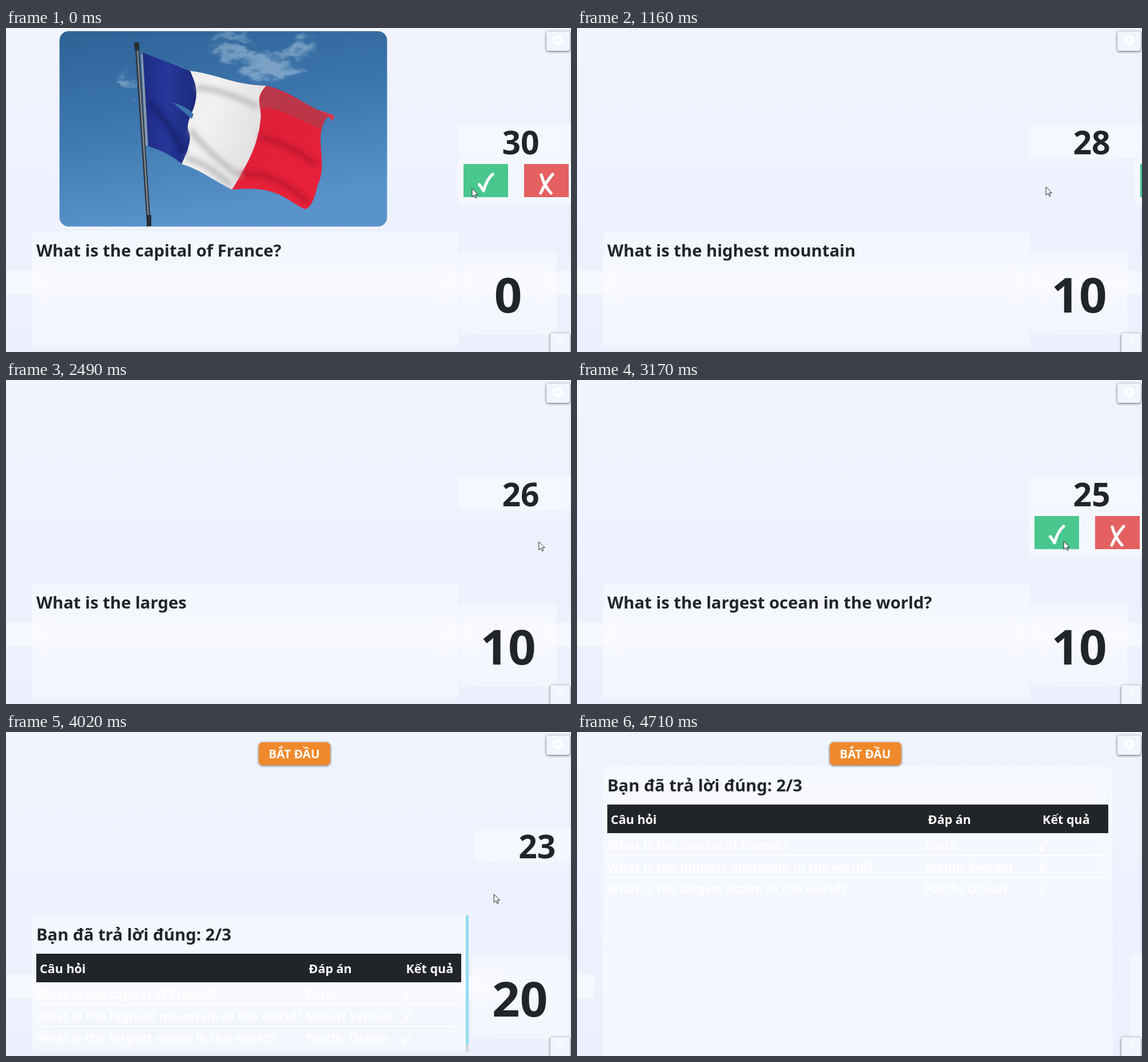
An HTML page for the animation above (4880 ms loop, 988 px wide and 567 px high).

```html
<!DOCTYPE html>
<html lang="en">
<head>
<meta charset="utf-8">
<title>Quiz</title>
<style>
  html, body { margin: 0; width: 100%; height: 100%; overflow: hidden; }
  body { position: relative; background: linear-gradient(#f0f4ff, #edf2fe 50%, #ecf0fd); }
  div, svg { position: absolute; }
  svg { inset: 0; }
  .card { background: rgba(255,255,255,.42); border-radius: 8px; backdrop-filter: blur(15px); }
  #bar { left: 0; top: 425px; height: 41px; background: rgba(255,255,255,.5); border-radius: 0 6px 6px 0; }
  #panel { left: 45px; }
  #timer { left: 790px; top: 170px; width: 220px; height: 58px; }
  #buttons { left: 790px; top: 229px; width: 220px; height: 81px; }
  #score { left: 793px; top: 390px; width: 170px; height: 147px; }
  #edge { right: 0; top: 0; width: 5px; height: 400px; background: linear-gradient(90deg, transparent, rgba(40,50,90,.06)); }
  .tool { background: #f1f5ff; border-radius: 4px; box-shadow: 0 1px 4px rgba(0,0,0,.65); }
  #start { left: 442px; top: 18px; width: 125px; height: 40px; background: #ef892b; border-radius: 7px; box-shadow: 0 1px 4px rgba(0,0,0,.6); }
  text { font: 700 21.5px "Noto Sans", "Open Sans", sans-serif; fill: #fff; white-space: pre; }
  .big { font-size: 29.2px; fill: #212529; }
  .num { fill: #212529; text-anchor: middle; }
  .icon { fill: none; stroke: #fff; stroke-linecap: round; stroke-linejoin: round; }
  .gear { fill: none; stroke: #fff; }
</style>
</head>
<body>
<div id="bar"></div>
<div id="edge"></div>
<div id="panel" class="card"></div>
<div id="timer" class="card"></div>
<div id="buttons" class="card"></div>
<div id="score" class="card"></div>
<div id="start"></div>
<div class="tool" style="left:945px;top:6px;width:41px;height:34px"></div>
<div class="tool" style="left:952px;top:534px;width:34px;height:34px"></div>

<svg width="988" height="567" viewBox="0 0 988 567">
  <defs>
    <linearGradient id="sky" x2=".25" y2="1"><stop stop-color="#2d6397"/><stop offset=".5" stop-color="#3d77ae"/><stop offset="1" stop-color="#5a93ca"/></linearGradient>
    <linearGradient id="blue"><stop stop-color="#1c2a80"/><stop offset=".5" stop-color="#26379a"/><stop offset="1" stop-color="#1b2a7c"/></linearGradient>
    <linearGradient id="white" y2=".4"><stop stop-color="#ececef"/><stop offset=".45" stop-color="#f2f1f1"/><stop offset="1" stop-color="#e2e0e1"/></linearGradient>
    <linearGradient id="red" x2=".5" y2="1"><stop stop-color="#c92f40"/><stop offset=".4" stop-color="#df2038"/><stop offset="1" stop-color="#e8223a"/></linearGradient>
    <filter id="soft" x="-50%" y="-50%" width="200%" height="200%"><feGaussianBlur stdDeviation="5"/></filter>
    <filter id="wisps" x="-30%" y="-30%" width="160%" height="160%">
      <feTurbulence type="fractalNoise" baseFrequency=".03 .05" numOctaves="4" seed="4" result="noise"/>
      <feGaussianBlur in="SourceGraphic" stdDeviation="4"/>
      <feDisplacementMap in2="noise" scale="45" xChannelSelector="R" yChannelSelector="G"/>
    </filter>
    <clipPath id="rounded"><rect x="93.500" y="5.500" width="573" height="342" rx="16"/></clipPath>
    <clipPath id="cloth"><path d="M239 43L322 75C370 81 400 100 455 101C505 113 525 140 574 154L562 156C535 190 565 235 545 275Q536 316 522 317C490 302 475 274 395 283C360 265 340 248 307 238Q285 218 249 207Z"/></clipPath>
    <path id="yes" d="M-11.500 4Q-7 9 -4 15Q2 -6 12 -14"/>
    <path id="no" d="M-9 -14Q-4 5 8 18M11 -15Q-2 0 -10 18"/>
  </defs>

  <g id="frame">
    <rect x="92.500" y="4.500" width="575" height="344" rx="17" fill="none" stroke="#fff" stroke-opacity=".65" stroke-width="2"/>
    <g id="photo" clip-path="url(#rounded)">
      <path fill="url(#sky)" d="M93 5H667V348H93Z"/>
      <g filter="url(#wisps)" fill="#a9c3db" opacity=".6">
        <ellipse cx="420" cy="50" rx="65" ry="9" transform="rotate(12 420 50)"/>
        <ellipse cx="465" cy="75" rx="58" ry="13"/>
        <ellipse cx="505" cy="38" rx="38" ry="8" transform="rotate(-12 505 38)"/>
        <ellipse cx="390" cy="15" rx="35" ry="5"/>
        <ellipse cx="213" cy="98" rx="9" ry="17" transform="rotate(-35 213 98)"/>
      </g>
      <path d="M229 32L250 347" stroke="#30363f" stroke-width="7"/>
      <path d="M230 40L249 330" stroke="#7e8b99" stroke-width="2.500"/>
      <path d="M238 45L246 206" stroke="#8b98ab" stroke-width="4"/>
      <path d="M224 25H233V38H225ZM246 327H254V347H246Z" fill="#292d34"/>
      <g clip-path="url(#cloth)">
        <path fill="url(#red)" d="M390 90H580V320H390Z"/>
        <path fill="#a94350" opacity=".65" d="M455 101Q443 120 444 138C485 140 520 165 553 178L574 154Q500 120 455 101Z"/>
        <path fill="url(#white)" d="M300 60L455 101C432 125 449 140 445 160C442 200 425 235 395 283L300 260Z"/>
        <path fill="url(#blue)" d="M230 30L322 75C330 95 336 105 331 130C327 150 314 165 319 180C326 192 318 215 307 238L245 215Z"/>
        <path fill="#3b73ab" d="M291 130Q320 139 328 151L325 159Z"/>
        <g fill="none" stroke-width="8" filter="url(#soft)">
          <path stroke="#b8b6bb" d="M333 105Q375 105 440 138M322 178Q350 215 408 259M316 228Q350 235 393 275"/>
          <path stroke="#b8172f" d="M410 255Q470 250 528 305M443 190Q490 200 545 240"/>
          <path stroke="#141f65" d="M250 130Q285 165 312 220"/>
        </g>
      </g>
      <path fill="#e53346" d="M545 143L574 153L571 163L563 153Z"/>
    </g>
  </g>

  <g id="controls">
    <path fill="#49c78e" d="M800 238h78v58h-78z"/>
    <path fill="#e46061" d="M906 238h78v58h-78z"/>
    <g class="icon" stroke-width="5.200"><use href="#yes" x="839" y="270"/><use href="#no" x="945" y="271"/></g>
  </g>

  <text id="question" class="big" x="53" y="400"></text>
  <text id="seconds" class="num" x="900" y="221" style="font-size:57px"></text>
  <text id="points" class="num" x="878" y="498" style="font-size:85px"></text>

  <g id="results">
    <text x="504" y="46" text-anchor="middle" style="font-size:20.8px">BẮT ĐẦU</text>
    <g id="table">
      <text class="big" x="53" y="44">Bạn đã trả lời đúng: 2/3</text>
      <rect class="wide" x="53" y="67" height="50" fill="#212529"/>
      <rect class="wide" x="53" y="155" height="2" fill="#fff"/>
      <rect class="wide" x="53" y="193" height="2" fill="#fff"/>
      <text x="59" y="101">Câu hỏi</text>
      <text x="53" y="146">What is the capital of France?</text>
      <text x="53" y="184">What is the highest mountain in the world?</text>
      <text x="53" y="222">What is the largest ocean in the world?</text>
      <g id="answers">
        <text x="6" y="101">Đáp án</text>
        <text y="146">Paris</text>
        <text y="184">Mount Everest</text>
        <text y="222">Pacific Ocean</text>
      </g>
      <g id="marks">
        <text x="7" y="101">Kết quả</text>
        <g class="icon" stroke-width="5">
          <use href="#yes" transform="translate(8 139) scale(.6)"/>
          <use href="#no" transform="translate(8 177) scale(.6)"/>
          <use href="#yes" transform="translate(8 215) scale(.6)"/>
        </g>
      </g>
      <g id="scroll"><rect id="track" width="5" fill="#d0d5dc"/><rect id="thumb" width="5" fill="#92dcf0"/></g>
    </g>
  </g>

  <g class="gear">
    <circle cx="965" cy="21" r="5.500" stroke-width="4.500"/>
    <circle cx="965" cy="21" r="8.500" stroke-width="3" stroke-dasharray="4.450"/>
  </g>
  <text x="969" y="557" text-anchor="middle" style="font-size:23px">?</text>
  <path id="cursor" d="M0 0V14.500L3.500 11.300L6 16.500L8 15.500L5.700 10.500H10.300Z" fill="#fff" stroke="#222" stroke-width="1"/>
</svg>

<script>
const LOOP = 4880, STEP = 168, LAST_STEP = 28;
const CLICKS = [540, 1950, 3530];
const RESULTS = 3918, GROW = 1012;
const TICKS = [300, 1170, 1840, 2340, 2830, 3500, 4020];
const QUESTIONS = [
  "What is the capital of France?",
  "What is the highest mountain in the world?",
  "What is the largest ocean in the world?"
];
const POINTER = [
  [0, 815, 281], [300, 820, 278], [1690, 820, 278], [1950, 930, 282], [2350, 932, 283],
  [3150, 851, 282], [4030, 853, 283], [4368, 893, 428], [4600, 1000, 500]
];

const $ = id => document.getElementById(id);
const clamp = v => Math.max(0, Math.min(1, v));
const move = (id, x, y = 0) => $(id).setAttribute("transform", `translate(${x} ${y})`);
const show = (id, on) => { $(id).style.display = on ? "" : "none"; };

// cubic-bezier(.25, .1, .25, 1)
function ease(x) {
  const curve = (s, a, b) => 3 * a * s * (1 - s) ** 2 + 3 * b * s * s * (1 - s) + s ** 3;
  let low = 0, high = 1;
  for (let i = 0; i < 20; i++) {
    const mid = (low + high) / 2;
    if (curve(mid, .25, .25) < x) low = mid; else high = mid;
  }
  return curve(low, .1, 1);
}

function pointerAt(t) {
  const i = POINTER.findIndex(p => p[0] > t);
  if (i < 0) return POINTER.at(-1).slice(1);
  const [t0, x0, y0] = POINTER[i - 1], [t1, x1, y1] = POINTER[i];
  const u = (t - t0) / (t1 - t0);
  return [x0 + (x1 - x0) * u, y0 + (y1 - y0) * u];
}

function drawQuiz(t, answered, since) {
  const typed = answered && answered < 3 ? Math.floor(since / 22) : Infinity;
  $("question").textContent = QUESTIONS[Math.min(answered, 2)].slice(0, typed);

  show("photo", !answered);
  show("frame", t < 760);
  move("frame", 0, answered ? -216 * since / 132 : 0);

  const out = answered ? clamp(since / 180) : 0;
  const back = answered < 3 ? clamp((since - 600) / 300) : 0;
  const slide = 210 * out * (1 - back);
  move("controls", slide);
  $("buttons").style.transform = `translateX(${slide}px)`;
}

function drawCounters(t, answered, since, p) {
  $("seconds").textContent = 30 - TICKS.filter(tick => tick <= t).length;
  move("seconds", 250 * p);
  $("timer").style.transform = `translateX(${250 * p}px)`;

  $("points").textContent = [0, 10, 10, 20][answered];
  const pop = answered % 2 ? 1 + .29 * Math.sin(Math.PI * clamp(since / 264)) : 1;
  $("points").setAttribute("transform",
    `translate(${180 * p} 0) translate(878 461) scale(${pop}) translate(-878 -461)`);
  $("score").style.transform = `translateX(${180 * p}px)`;
}

function drawPanel(p) {
  const top = 356 - 305 * p, width = 747 + 150 * p, height = 202 + 318 * p;
  Object.assign($("panel").style, { top: top + "px", width: width + "px", height: height + "px" });
  $("bar").style.width = 988 * (1 - p) + "px";

  const overflow = height < 252;
  const inner = width - 16 - (overflow ? 5 : 0);
  move("table", 0, Math.round(top));
  document.querySelectorAll(".wide").forEach(r => r.setAttribute("width", Math.round(inner)));
  move("answers", 53 + .633 * inner);
  move("marks", 53 + .8605 * inner);
  show("scroll", overflow);
  move("scroll", Math.round(40 + width));
  $("track").setAttribute("height", height);
  $("thumb").setAttribute("height", height * height / 252);
}

function draw(now) {
  const t = STEP * Math.min(LAST_STEP, Math.floor((now % LOOP + 25) / STEP));
  const answered = CLICKS.filter(c => c <= t).length;
  const since = answered ? t - CLICKS[answered - 1] : 0;
  const done = t >= RESULTS;
  const p = ease(clamp((t - RESULTS) / GROW));

  drawQuiz(t, answered, since);
  drawCounters(t, answered, since, p);
  drawPanel(p);
  show("question", !done);
  show("controls", !done);
  show("buttons", !done);
  show("start", done);
  show("results", done);
  move("cursor", ...pointerAt(t));
  requestAnimationFrame(draw);
}
requestAnimationFrame(draw);
</script>
</body>
</html>
```
